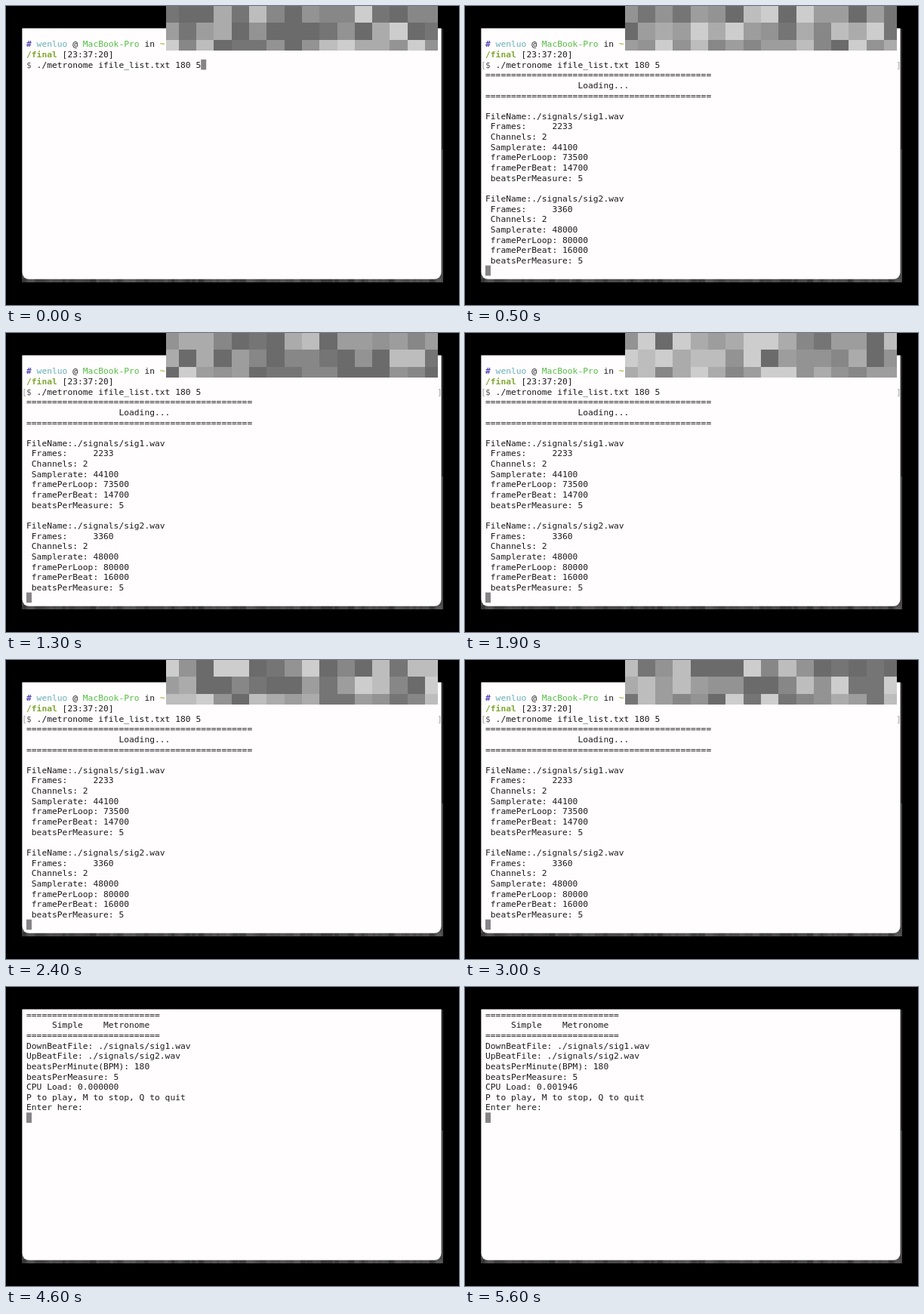
An HTML page with a canvas that plays this animation: 600 px wide and 396 px high, repeating every 8000 ms.

```html
<!DOCTYPE html>
<html lang="en">
<head>
<meta charset="utf-8">
<title>Metronome in a terminal</title>
<style>
  html, body { margin: 0; height: 100%; overflow: hidden; background: #000; }
  canvas { display: block; }
</style>
</head>
<body>
<canvas id="stage" width="600" height="396"></canvas>
<script>
const ctx = document.getElementById('stage').getContext('2d');
const LOOP = 8000, LOAD = 300, READY = 3700, KEY = 5000, REFRESH = 5600;
const LEFT = 27, CHAR = 6.8, TOP = 36.7, LINE = 13.64;
const INK = '#1c1a1c';

// Repeatable noise in 0..1
function rand(seed) {
  const v = Math.sin(seed * 12.9898 + 4.137) * 43758.5453;
  return v - Math.floor(v);
}

function rect(x, y, w, h, color) {
  ctx.fillStyle = color;
  ctx.fillRect(x, y, w, h);
}

const gray = v => `rgb(${v},${v - 1},${v})`;

// Draw on the character grid
function put(row, col, text, color = INK, weight = 400) {
  ctx.font = `${weight} 11.3px "DejaVu Sans Mono", monospace`;
  ctx.fillStyle = color;
  [...text].forEach((ch, i) =>
    ctx.fillText(ch, LEFT + (col + i) * CHAR, TOP + row * LINE + 4));
}

function putLines(row, lines) {
  lines.forEach((line, i) => put(row + i, 0, line));
}

function cursor(row, col) {
  rect(LEFT + col * CHAR, TOP + row * LINE - 6.8, 7, 13.6, '#868486');
}

function drawWindow() {
  rect(0, 0, 600, 396, '#000');
  rect(21, 30, 558, 336, '#4b4a4b');
  rect(577, 30, 2, 160, '#29282a');
  for (let i = 0; i < 62; i++)
    rect(21 + i * 9, 361, 3 + 6 * rand(i), 5, gray(56 + Math.floor(36 * rand(i + 200))));
  ctx.fillStyle = '#fffdfe';
  ctx.beginPath();
  ctx.roundRect(21.5, 29.5, 555, 332.3, [0, 0, 9, 9]);
  ctx.fill();
}

function drawMosaic(t) {
  const step = Math.floor(t / 100);
  const shades = [108, 118, 136, 148, 158, 172, 190, 206];
  // The blocks swell between dark and light
  const bias = 1.3 + 0.6 * Math.cos(step * 100 / 1350 * 2 * Math.PI);
  const ys = [0, 22, 45, 59];
  for (let c = 0; c < 16; c++) {
    const x = Math.round(c ? 205.5 + c * 23.3 : 212);
    const end = Math.round(Math.min(572, 228.8 + c * 23.3));
    for (let r = 0; r < 3; r++) {
      const pick = rand(step * 71 + c * 3 + r) ** bias;
      rect(x, ys[r], end - x, ys[r + 1] - ys[r],
        gray(shades[Math.floor(pick * shades.length)]));
    }
  }
}

function fileInfo(name, frames, rate, loop, beat) {
  return [
    `FileName:./signals/${name}.wav`,
    ` Frames:     ${frames}`,
    ' Channels: 2',
    ` Samplerate: ${rate}`,
    ` framePerLoop: ${loop}`,
    ` framePerBeat: ${beat}`,
    ' beatsPerMeasure: 5'
  ];
}

function drawShell(t) {
  put(1, 0, '#', '#5146b4', 700);
  put(1, 2, 'wenluo', '#66b0b8');
  put(1, 9, '@');
  put(1, 11, 'MacBook-Pro', '#55bd45');
  put(1, 23, 'in');
  put(1, 26, '~', '#a9b53a', 700);
  put(2, 0, '/final', '#7fa832', 700);
  put(2, 7, '[23:37:20]');
  put(3, 0, '$', '#5c5659');
  put(3, 2, './metronome ifile_list.txt 180 5');
  if (t < LOAD) {
    cursor(3, 34);
  } else {
    put(3, -0.9, '[', '#a5a3a5');
    put(3, 80, ']', '#a5a3a5');
    const rule = '='.repeat(44);
    putLines(4, [rule, ' '.repeat(18) + 'Loading...', rule]);
    putLines(8, fileInfo('sig1', 2233, 44100, 73500, 14700));
    putLines(16, fileInfo('sig2', 3360, 48000, 80000, 16000));
    cursor(23, 0);
  }
  drawMosaic(t);
}

function drawPlayer(t) {
  const rule = '='.repeat(26);
  const typed = t >= KEY && t < REFRESH ? 'p' : '';
  putLines(0, [
    rule,
    '     Simple    Metronome',
    rule,
    'DownBeatFile: ./signals/sig1.wav',
    'UpBeatFile: ./signals/sig2.wav',
    'beatsPerMinute(BPM): 180',
    'beatsPerMeasure: 5',
    `CPU Load: ${t < REFRESH ? '0.000000' : '0.001946'}`,
    'P to play, M to stop, Q to quit',
    'Enter here:',
    typed
  ]);
  cursor(10, typed.length);
}

function frame() {
  const t = performance.now() % LOOP;
  drawWindow();
  (t < READY ? drawShell : drawPlayer)(t);
  requestAnimationFrame(frame);
}
frame();
</script>
</body>
</html>
```
